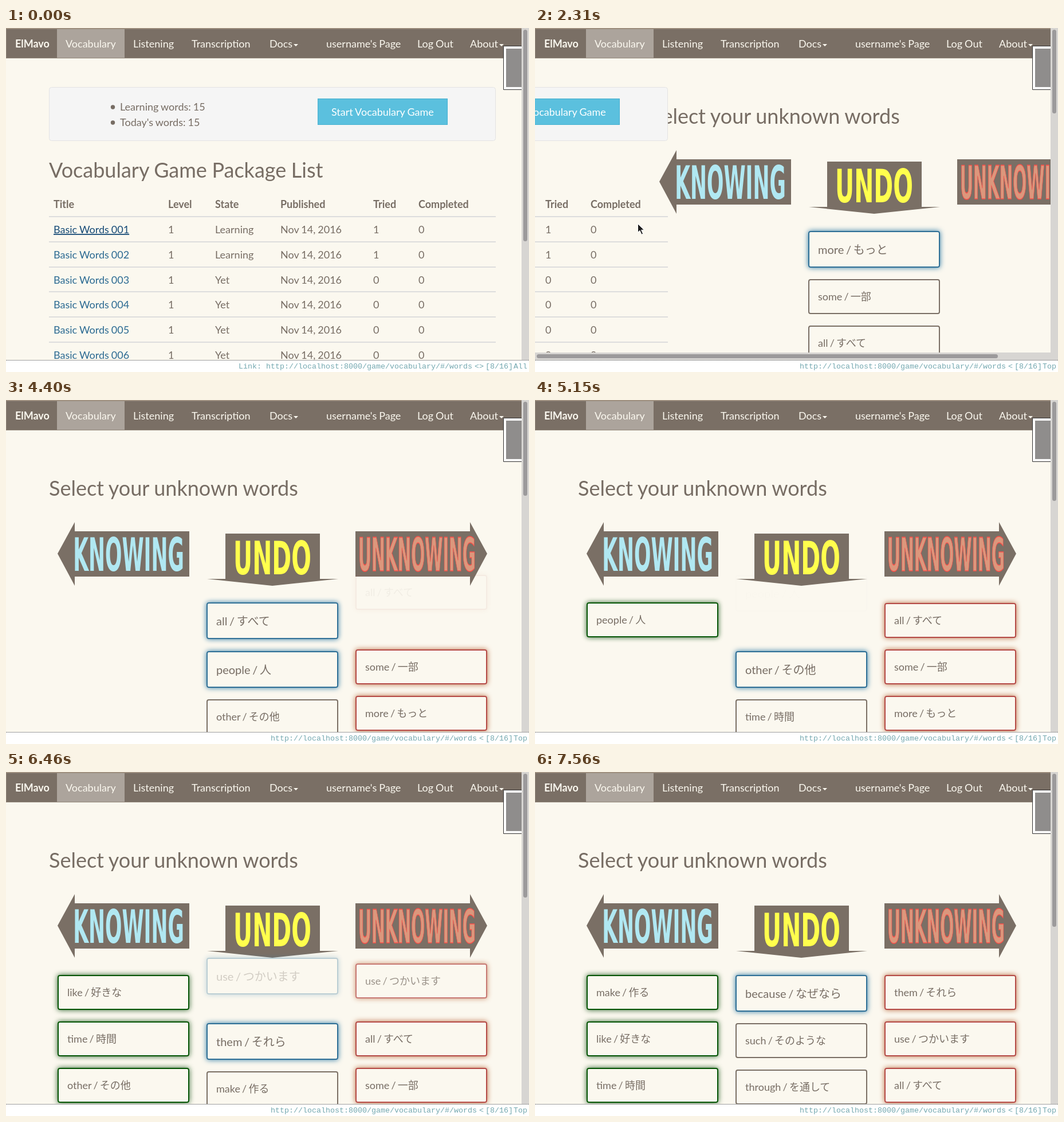
An HTML page for the animation above (7.69 s loop, 913x600 px).

```html
<!DOCTYPE html>
<html lang="en">
<head>
<meta charset="utf-8">
<title>Vocabulary game</title>
<style>
  :root { --page: #fbf8ef; --ink: #776d64; --bar: #7a6f65; }
  html, body { margin: 0; width: 100%; height: 100%; overflow: hidden; background: #fff; }
  #stage { position: relative; width: 913px; height: 600px; overflow: hidden; font: 18px Lato, sans-serif; color: var(--ink); }
  #stage > *, #view > *, #game > * { position: absolute; left: 0; top: 0; }
  #view { width: 900px; height: 579px; overflow: hidden; background: var(--page); }
  #game { width: 900px; height: 579px; }
  svg { display: block; overflow: visible; }
  text { font-size: 18px; fill: var(--ink); white-space: pre; word-spacing: -.6px; }
  .head { font-size: 36px; }
  .bold { font-weight: 700; }
  .link { fill: #2b6a92; }
  .hover .first { fill: #154a76; text-decoration: underline; }
  .nav text { fill: #fbf8ef; }
  .sign { font: 700 80px "DejaVu Sans", sans-serif; text-anchor: middle; }
  .status text { font: 13.33px "Liberation Mono", monospace; fill: #74a8b0; word-spacing: 0; }
  .end { text-anchor: end; }
  .card {
    box-sizing: border-box; width: 230px; padding: 15px; border: 2px solid var(--bar);
    border-radius: 4px; line-height: 1.5; white-space: nowrap; word-spacing: -1.4px;
    font-family: Lato, "Noto Sans CJK JP", "Noto Sans CJK", sans-serif;
  }
  .active { font-size: 20px; border-color: #2e6f96; box-shadow: 0 0 10px #2e7aa6; }
  .known { border-color: #045404; box-shadow: 0 0 10px #2c622c; }
  .unknown { border-color: #b54a46; box-shadow: 0 0 10px #bb6c42; }
  .track { background: #d7d5d2; }
  .thumb { background: #9c9a9b; border-radius: 4px; }
</style>
</head>
<body>
<div id="stage">
  <div id="view">
    <div id="game">
      <svg width="900" height="579">
        <text class="head" x="75" y="167">Select your unknown words</text>
        <g fill="#7a6f65">
          <path d="M90 268L120 213V229H320V308H120V324Z"/>
          <path d="M383 233H548V312H580L465 324L351 312H383Z"/>
          <path d="M840 268L810 213V229H610V308H810V324Z"/>
        </g>
        <text class="sign" transform="translate(214 298) scale(.433 1)" style="fill:#b0e8f2">KNOWING</text>
        <text class="sign" transform="translate(465 304) scale(.51 1)" style="fill:#ffff4d">UNDO</text>
        <text class="sign" transform="translate(717.5 298) scale(.354 1)" style="fill:#dc977c;stroke:#fc504a;stroke-width:1.2;vector-effect:non-scaling-stroke">UNKNOWING</text>
      </svg>
    </div>
    <svg id="list" width="900" height="579">
      <rect x="75.5" y="103.5" width="779" height="93" rx="4" fill="#f5f5f5" stroke="#e3e3e3"/>
      <circle cx="186.500" cy="138" r="3.7" fill="#776d64"/>
      <circle cx="186.500" cy="165" r="3.7" fill="#776d64"/>
      <text x="199" y="144">Learning words: 15</text>
      <text x="199" y="171">Today's words: 15</text>
      <rect x="544.5" y="123.5" width="226" height="45" fill="#5bc0de" stroke="#46b0d0"/>
      <text x="568" y="153" style="fill:#fff">Start Vocabulary Game</text>
      <text class="head" x="75" y="261">Vocabulary Game Package List</text>
      <g id="table"></g>
    </svg>
  </div>

  <svg class="nav" width="900" height="120">
    <rect width="900" height="2" fill="#a99783"/>
    <rect y="1" width="900" height="52" fill="#94897d"/>
    <rect x="1" y="2" width="899" height="50" fill="#7a6f65"/>
    <rect x="89" y="2" width="118" height="50" fill="#aca49c"/>
    <g id="menu"></g>
    <path d="M502 28h8l-4 4zM861 28h8l-4 4z" fill="#fbf8ef"/>
    <path d="M900 31.500H868.500V107.500H900" fill="#fff" stroke="#333"/>
    <rect x="873" y="36" width="27" height="67" fill="#8f8d8c"/>
  </svg>

  <div class="track" style="left:900px;width:13px;height:579px"></div>
  <div class="thumb" id="vbar" style="left:903px;top:3px;width:7px"></div>
  <div id="hbar" class="track" style="top:566px;width:913px;height:13px"></div>
  <div id="hthumb" class="thumb" style="left:3px;top:569px;height:7px"></div>

  <svg class="status" width="913" height="600">
    <rect y="579" width="913" height="21" fill="#fff"/>
    <path d="M0 579.500H913" stroke="#444" stroke-dasharray="1 1"/>
    <text id="url" class="end" y="594"></text>
    <text id="back" class="end" x="834" y="594"></text>
    <text x="837" y="594">[8/16]</text>
    <text id="where" class="end" x="910" y="594"></text>
  </svg>

  <svg id="cursor" width="14" height="22">
    <path d="M.500 .500V15.500L4 12.300L7 19.200L9.600 18L6.600 11.300H11.500Z" fill="#1c1c1c" stroke="#fff"/>
  </svg>
</div>

<script>
const LOOP = 7690, STEP = 40, MOVE = 240;
const SLIDE = 2150, SLIDE_END = 2430, PAGE_SHIFT = 750;
const TOP = 354, GAP = 20;
const COLUMN = { known: 90, center: 350, unknown: 610 };
const SITE = 'http://localhost:8000/game/vocabulary/#/';

// word, meaning, column it is sorted into, moment of sorting
const WORDS = [
  ['more', 'もっと', 'unknown', 3570],
  ['some', '一部', 'unknown', 3990],
  ['all', 'すべて', 'unknown', 4400],
  ['people', '人', 'known', 4950],
  ['other', 'その他', 'known', 5230],
  ['time', '時間', 'known', 5480],
  ['like', '好きな', 'known', 5930],
  ['use', 'つかいます', 'unknown', 6380],
  ['them', 'それら', 'unknown', 6990],
  ['make', '作る', 'known', 7320],
  ['because', 'なぜなら'],
  ['such', 'そのような'],
  ['through', 'を通して']
];

const $ = id => document.getElementById(id);

function addText(parent, x, y, text, cls = '') {
  const el = document.createElementNS('http://www.w3.org/2000/svg', 'text');
  el.setAttribute('x', x);
  el.setAttribute('y', y);
  el.setAttribute('class', cls);
  el.textContent = text;
  parent.append(el);
}

function buildMenu() {
  const items = [[104, 'Vocabulary'], [222, 'Listening'], [324, 'Transcription'],
    [460, 'Docs'], [559, "username's Page"], [718, 'Log Out'], [810, 'About']];
  addText($('menu'), 16, 34, 'ElMavo', 'bold');
  for (const [x, label] of items) addText($('menu'), x, 34, label);
}

function buildTable() {
  const table = $('table'), cols = [83, 283, 365, 479, 641, 720], pitch = 43.75;
  const titles = ['Title', 'Level', 'State', 'Published', 'Tried', 'Completed'];
  titles.forEach((s, i) => addText(table, cols[i], 313.5, s, 'bold'));
  for (let r = 0; r < 6; r++) {
    const tried = r < 2;
    const cells = ['Basic Words 00' + (r + 1), '1', tried ? 'Learning' : 'Yet',
      'Nov 14, 2016', tried ? '1' : '0', '0'];
    cells.forEach((s, i) => addText(table, cols[i], 358 + Math.round(r * pitch), s,
      i ? '' : r ? 'link' : 'link first'));
    const line = document.createElementNS('http://www.w3.org/2000/svg', 'rect');
    const box = { x: 75, y: 328 + Math.round(r * pitch), width: 780, height: 2, fill: '#ddd' };
    for (const k in box) line.setAttribute(k, box[k]);
    table.append(line);
  }
}

function makeCard(label, column) {
  const el = document.createElement('div');
  el.className = 'card ' + column;
  el.textContent = label;
  el.style.left = COLUMN[column] + 'px';
  $('game').append(el);
  return el;
}

function place(el, y, opacity) {
  el.style.display = y < 600 ? '' : 'none';
  el.style.top = y + 'px';
  el.style.opacity = opacity;
}

// the CSS "ease" curve, solved by bisection
function ease(x) {
  if (x <= 0) return 0;
  if (x >= 1) return 1;
  const bez = (a, b, s) => 3 * a * s * (1 - s) ** 2 + 3 * b * s * s * (1 - s) + s ** 3;
  let lo = 0, hi = 1;
  for (let i = 0; i < 24; i++) {
    const mid = (lo + hi) / 2;
    if (bez(.25, .25, mid) < x) lo = mid; else hi = mid;
  }
  return bez(.1, 1, lo);
}

const stepped = ms => Math.floor(ms / STEP) * STEP;

buildMenu();
buildTable();
const cards = WORDS.map(([word, meaning, side, start = Infinity]) => {
  const label = word + ' / ' + meaning;
  return { side, start, center: makeCard(label, 'center'), sorted: side && makeCard(label, side) };
});

function drawCards(t) {
  const progress = c => ease((stepped(t - c.start) + 6) / 250);
  let y = TOP, next = true, gone = 0;
  for (const c of cards) {
    if (t >= c.start + MOVE) {
      c.center.style.display = 'none';
      gone++;
      continue;
    }
    const leaving = t >= c.start, p = leaving ? progress(c) : 0;
    const active = leaving || next;
    if (!leaving) next = false;
    c.center.classList.toggle('active', active);
    place(c.center, y - 50 * p, (1 - p) ** 1.3);
    y += (active ? 64 : 61) + GAP;
  }
  const slot = { known: 0, unknown: 0 };
  for (const c of [...cards].reverse()) {
    if (!c.side) continue;
    if (t < c.start) { c.sorted.style.display = 'none'; continue; }
    const p = progress(c);
    place(c.sorted, TOP + 81 * slot[c.side]++ - 50 * (1 - p), p ** .6);
  }
  return gone;
}

function drawPages(t) {
  const p = t >= SLIDE_END ? 1 : ease((stepped(t - SLIDE) - 1) / 300);
  const shift = Math.round(PAGE_SHIFT * (1 - p)), width = 873 + shift;
  const inGame = t >= SLIDE, wide = inGame && width > 900;
  $('game').style.display = inGame ? '' : 'none';
  $('game').style.transform = `translateX(${shift}px)`;
  $('list').style.display = t < SLIDE_END ? '' : 'none';
  $('list').style.transform = `translateX(${shift - PAGE_SHIFT}px)`;
  $('hbar').style.display = $('hthumb').style.display = wide ? '' : 'none';
  $('hthumb').style.width = 894 * 900 / width + 'px';
  const gone = drawCards(t);
  const thumb = inGame ? 1 / (.00667 - .000292 * gone) * (wide ? .975 : 1) : 369;
  $('vbar').style.height = Math.round(thumb) + 'px';
}

function drawStatus(t) {
  const hover = t < 680 || t >= 1480, opened = t >= 1970;
  $('list').classList.toggle('hover', hover);
  $('url').setAttribute('x', opened ? 822 : 814);
  $('url').textContent = opened ? SITE + 'words' : hover ? 'Link: ' + SITE + 'words' : SITE;
  $('back').textContent = opened ? '<' : '<>';
  $('where').textContent = t < SLIDE ? 'All' : 'Top';
}

function drawCursor(t) {
  const s = Math.min(1, (stepped(t - 680) + STEP) / 880), q = 1 - s;
  const path = (a, b, c, d) => a * q ** 3 + 3 * b * q * q * s + 3 * c * q * s * s + d * s ** 3;
  $('cursor').style.display = t >= 680 && t < 2590 ? '' : 'none';
  $('cursor').style.transform =
    `translate(${Math.round(path(910, 620, 330, 179))}px,${Math.round(path(585, 245, 330, 341))}px)`;
}

function frame() {
  const t = performance.now() % LOOP;
  drawPages(t);
  drawStatus(t);
  drawCursor(t);
  requestAnimationFrame(frame);
}
frame();
</script>
</body>
</html>
```
